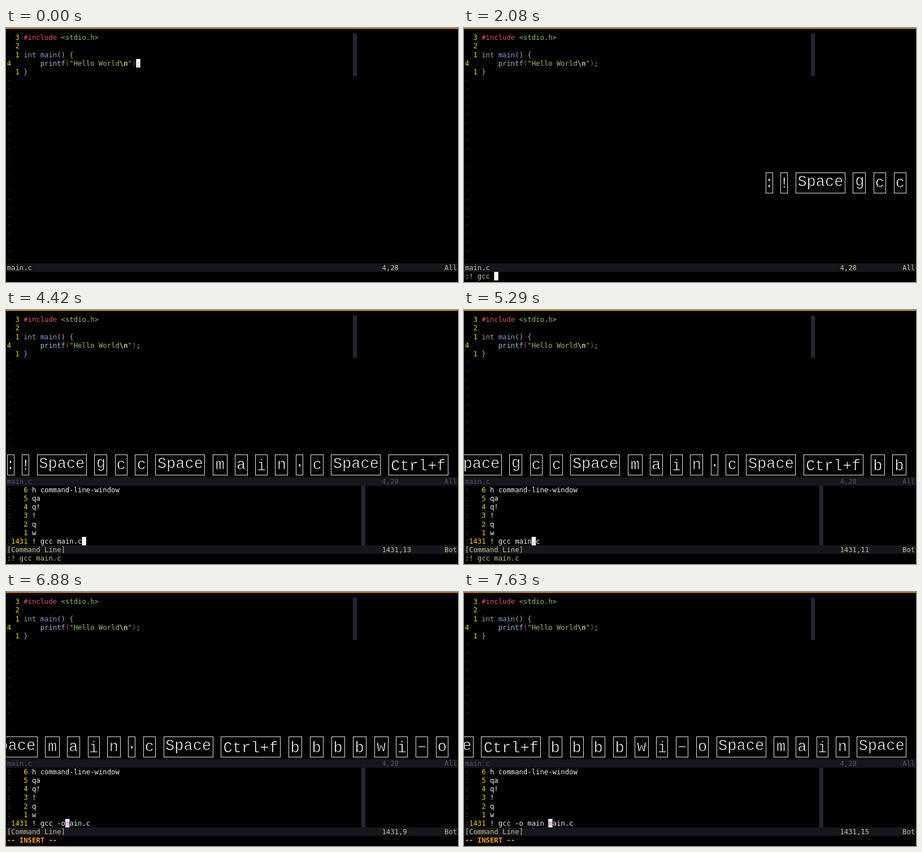
Write an HTML page with a canvas that moves like this. It is 800 px wide and 450 px high and loops after 8 s.

```html
<!DOCTYPE html>
<html>
<head>
<meta charset="utf-8">
<style>
html, body { margin: 0; width: 800px; height: 450px; overflow: hidden; background: #000; }
canvas { display: block; }
</style>
</head>
<body>
<canvas id="stage" width="800" height="450"></canvas>
<script>
const ctx = document.getElementById('stage').getContext('2d');
const LOOP = 8000, KEY_LAG = 50;
const LEFT = 1.7, TOP = 9.6, CELL_W = 7.375, CELL_H = 15.09;
const GOLD = '#f0d020', KHAKI = '#c8c093', WHITE = '#f4f4f4', DIM = '#54546d';
const BAR = '#16161d', RULER = '#252535', GREEN = '#98bb6c', RED = '#c34b5c', GREY = '#a9aeb4';

const keys = [
  [830, ':'], [1210, '!'], [1630, 'Space'], [1760, 'g'], [1880, 'c'], [1980, 'c'],
  [2080, 'Space'], [2260, 'm'], [2380, 'a'], [2470, 'i'], [2570, 'n'], [2700, '.'],
  [2880, 'c'], [3330, 'Space'], [4330, 'Ctrl+f'],
  [5040, 'b'], [5210, 'b'], [5380, 'b'], [5550, 'b'], [5920, 'w'], [6250, 'i'],
  [6500, '-'], [6710, 'o'], [6920, 'Space'], [7040, 'm'], [7130, 'a'], [7210, 'i'],
  [7290, 'n'], [7410, 'Space']
];
const WINDOW_KEY = 15, INSERT_KEY = 21;  // key counts that open the window / start inserting
const motions = [13, 12, 11, 7, 3, 7, 7];  // cursor column after each normal-mode key
const history = ['h command-line-window', 'qa', 'q!', '!', 'q', 'w'];

const code = [
  ['3', [['#include ', '#e0566c'], ['<stdio.h>', GREEN]]],
  ['2', []],
  ['1', [['int ', '#8fa59f'], ['main', '#8c9cd8'], ['() {', GREY]]],
  ['4', [['    printf', '#9db8d6'], ['(', RED], ['"Hello World', GREEN], ['\\n', '#d0c090', true],
         ['"', GREEN], [')', RED], [';', GREY]]],
  ['1', [['}', GREY]]]
];

const KEY_GAP = 13.4;
const boxWidths = { 'Space': 88, 'Ctrl+f': 106.3, ':': 13.2, '!': 13.2, '.': 13.2, g: 23, c: 22.5,
  m: 26, a: 22.8, i: 21.2, n: 23.5, b: 24.6, w: 25, '-': 22.7, o: 22.3 };

const cellX = col => LEFT + col * CELL_W;
const cellY = row => TOP + row * CELL_H;

function rect(x, y, w, h, color) {
  ctx.fillStyle = color;
  ctx.fillRect(x, y, w, h);
}

function text(col, row, str, color, bold) {
  ctx.font = (bold ? 'bold ' : '') + '12.25px "DejaVu Sans Mono", monospace';
  ctx.textAlign = 'left';
  ctx.fillStyle = color;
  [...str].forEach((ch, i) => ctx.fillText(ch, cellX(col + i), cellY(row) + 11.8));
}

function cursor(col, row, ch = ' ') {
  rect(cellX(col), cellY(row), CELL_W, CELL_H, '#fff');
  text(col, row, ch, '#b45cc4');
}

function statusLine(row, name, position, scroll, color) {
  rect(0, cellY(row), 800, CELL_H, BAR);
  text(0, row, name, color);
  text(90, row, position, color);
  text(105, row, scroll, color);
}

function drawEditor(lastRow) {
  rect(0, 0, 800, 1.5, '#e09a10');
  rect(cellX(83), TOP, CELL_W, 5 * CELL_H, RULER);
  code.forEach(([number, parts], row) => {
    text(number === '4' ? 0 : 2, row, number, GOLD);
    let col = 4;
    for (const [str, color, bold] of parts) {
      text(col, row, str, color, bold);
      col += str.length;
    }
  });
  for (let row = 5; row <= lastRow; row++)
    text(0, row, '~', row > 13 && row < 19 ? '#141414' : '#282828');
}

function drawCommandWindow(line, column) {
  statusLine(19, 'main.c', '4,28', 'All', DIM);
  rect(cellX(85), cellY(20), CELL_W, 7 * CELL_H, RULER);
  [...history, line].forEach((str, i) => {
    text(0, 20 + i, ':', '#4c4c54');
    text(1, 20 + i, String(i < 6 ? 6 - i : 1431).padStart(4), GOLD);
    text(6, 20 + i, str, WHITE);
  });
  cursor(column + 5, 26, line[column - 1]);
  statusLine(27, '[Command Line]', '1431,' + column, 'Bot', KHAKI);
}

// White label centred on its visible ink; a thin black outline makes the strokes lighter.
function keyLabel(label, x, y) {
  const str = label.replace('-', '\u2212');
  ctx.font = '27px "Liberation Mono", "Courier New", monospace';
  ctx.textAlign = 'center';
  const m = ctx.measureText(str);
  x += (m.actualBoundingBoxLeft - m.actualBoundingBoxRight) / 2;
  y += (m.actualBoundingBoxAscent - m.actualBoundingBoxDescent) / 2;
  ctx.fillStyle = '#fff';
  ctx.fillText(str, x, y);
  ctx.lineWidth = 0.7;
  ctx.strokeStyle = '#000';
  ctx.strokeText(str, x, y);
}

function drawKeys(labels) {
  let right = 783;
  for (const label of labels.reverse()) {
    const left = right - boxWidths[label];
    const x = Math.round(left) + 0.5;
    const width = Math.round(right) - 0.5 - x;
    rect(x, 256.5, width, 36, '#000');
    keyLabel(label, (left + right) / 2, 274);
    ctx.lineWidth = 1;
    ctx.strokeStyle = '#e8e8e8';
    ctx.strokeRect(x, 256.5, width, 36);
    right = left - KEY_GAP;
    if (right < 0) break;
  }
}

const typed = list => list.map(key => key === 'Space' ? ' ' : key).join('');

function draw(t) {
  const pressed = time => keys.filter(([at]) => at <= time).map(([, label]) => label);
  const now = pressed(t), count = now.length;
  const command = typed(now.slice(0, 14));
  rect(0, 0, 800, 450, '#000');

  if (count < WINDOW_KEY) {
    drawEditor(26);
    statusLine(27, 'main.c', '4,28', 'All', KHAKI);
    text(0, 28, command, KHAKI);
    if (!count) cursor(31, 3, ';');
    else if (t < 4170) cursor(command.length, 28);
  } else {
    const inserted = typed(now.slice(INSERT_KEY));
    const column = motions[Math.min(count - WINDOW_KEY, 6)] + inserted.length;
    drawEditor(18);
    drawCommandWindow('! gcc ' + inserted + 'main.c ', column);
    if (count < INSERT_KEY) text(0, 28, command, KHAKI);
    else text(0, 28, '-- INSERT --', '#ff9e3b', true);
  }
  drawKeys(pressed(t - KEY_LAG));
}

function tick() {
  draw(performance.now() % LOOP);
  requestAnimationFrame(tick);
}
tick();
</script>
</body>
</html>
```
